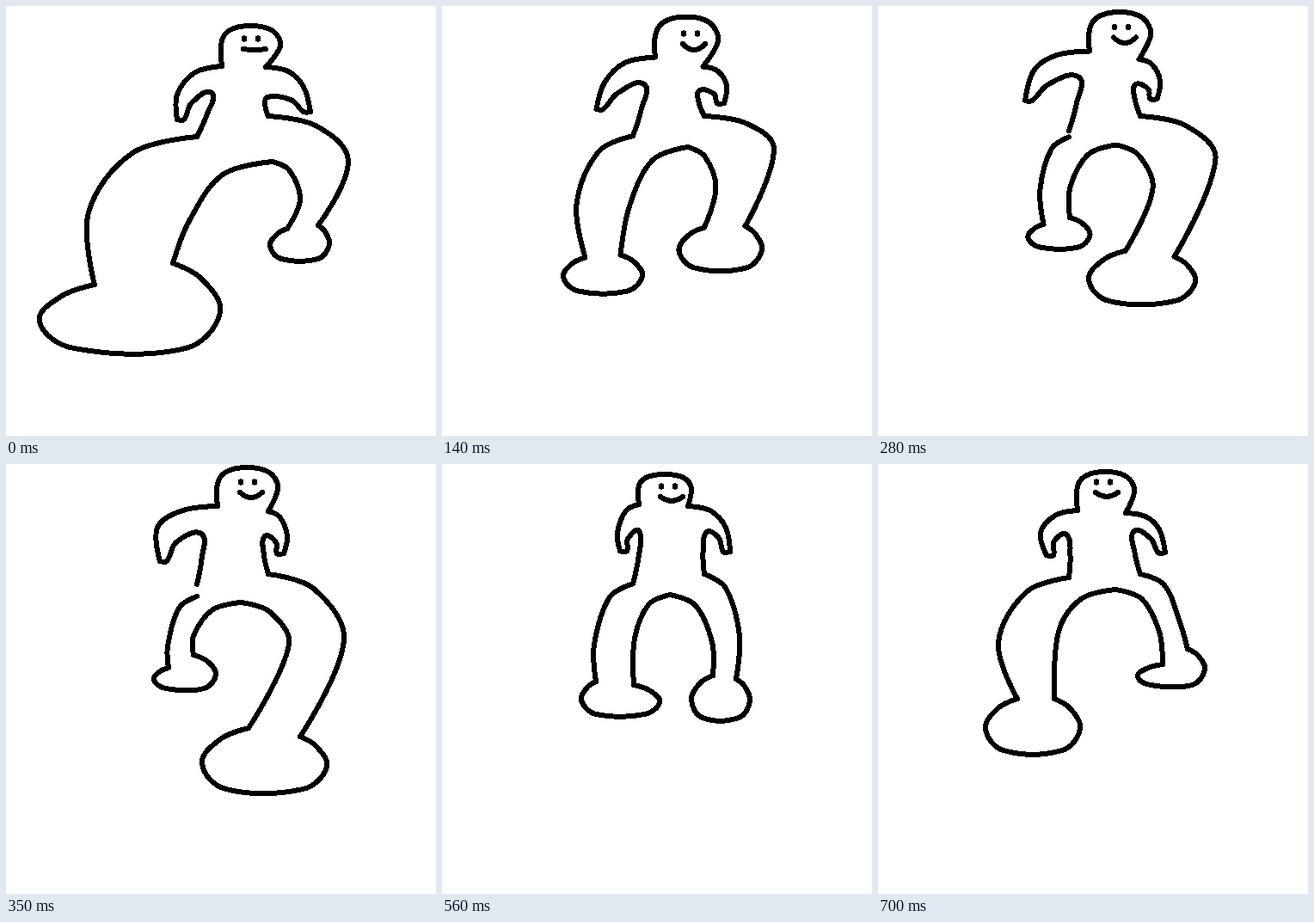
An HTML page that plays this animation: 500 by 500 pixels, repeating every 770 ms.

```html
<!DOCTYPE html>
<html lang="en">
<head>
<meta charset="utf-8">
<title>Stomping walk</title>
<style>
  html, body { margin: 0; width: 100%; height: 100%; overflow: hidden; background: #fff; }
  svg { display: block; width: 100%; height: 100%; }
  path {
    fill: none; stroke: #000; stroke-width: 6; stroke-linecap: round; stroke-linejoin: round;
    shape-rendering: crispEdges;
  }
</style>
</head>
<body>
<svg viewBox="0 0 500 500"><path id="ink"/></svg>
<script>
const STEP = 70, LOOP = 770;

// head: left neck, top, right, right neck    face: eye centre, smile depth
// arm:  elbow, hand, armpit
// leg:  knee, ankle, foot (outer x, inner x, sole y), inner ankle, inner knee
const poses = [
  { at: 0, head: [251, 70, 23, 319, 302, 71], face: [285, 38, 1], crotch: [310, 181], gap: 0,
    armL: [199, 103, 203, 132, 239, 101], armR: [346, 94, 350, 123, 304, 106],
    legL: [96, 240, 103, 324, 39, 249, 398, 194, 299, 213, 250],
    legR: [398, 180, 363, 255, 376, 307, 294, 327, 259, 342, 225] },
  { at: 70, head: [250, 63, 15, 324, 305, 72], face: [293, 36, 6], crotch: [290, 166], gap: 0,
    armL: [191, 103, 200, 133, 230, 98], armR: [333, 94, 326, 114, 301, 98],
    legL: [124, 246, 137, 314, 105, 217, 363, 187, 309, 208, 241],
    legR: [380, 182, 358, 246, 379, 289, 301, 316, 253, 327, 208] },
  { at: 210, head: [246, 56, 10, 318, 302, 69], face: [285, 28, 6], crotch: [281, 162], gap: 0,
    armL: [187, 75, 167, 107, 240, 84], armR: [329, 90, 322, 112, 297, 99],
    legL: [189, 215, 196, 271, 177, 249, 300, 228, 270, 229, 221],
    legR: [392, 150, 347, 266, 365, 262, 308, 294, 262, 310, 215] },
  { at: 350, head: [246, 49, 4, 316, 305, 55], face: [281, 21, 5], crotch: [273, 161], gap: 7,
    armL: [176, 74, 183, 113, 227, 81], armR: [327, 84, 319, 104, 301, 84],
    legL: [188, 212, 189, 237, 172, 244, 261, 218, 222, 218, 200],
    legR: [393, 205, 342, 317, 373, 228, 378, 282, 307, 329, 210] },
  { at: 420, head: [239, 48, 6, 295, 292, 47], face: [264, 20, 3], crotch: [270, 154], gap: 5,
    armL: [190, 80, 198, 107, 224, 82], armR: [333, 68, 331, 110, 308, 71],
    legL: [191, 200, 197, 232, 185, 252, 267, 225, 226, 222, 195],
    legR: [373, 214, 343, 305, 366, 265, 345, 300, 302, 324, 215] },
  { at: 560, head: [229, 47, 12, 290, 286, 49], face: [263, 26, 4], crotch: [265, 152], gap: 0,
    armL: [204, 80, 211, 101, 229, 78], armR: [330, 74, 331, 102, 308, 79],
    legL: [177, 210, 179, 253, 162, 253, 291, 223, 257, 224, 203],
    legR: [346, 200, 342, 250, 358, 290, 295, 315, 246, 314, 207] },
  { at: 700, head: [232, 54, 9, 298, 288, 57], face: [262, 21, 4], crotch: [276, 146], gap: 0,
    armL: [189, 80, 200, 106, 219, 82], armR: [327, 76, 330, 103, 298, 78],
    legL: [140, 208, 162, 273, 125, 235, 333, 205, 273, 210, 195],
    legR: [351, 184, 360, 215, 380, 302, 257, 331, 233, 327, 195] }
];

const mix = (a, b, u) => a + (b - a) * u;
const between = (p, q, u, v = u) => [mix(p[0], q[0], u), mix(p[1], q[1], v)];

// A limb leaves its root sideways, then bends down into the joint.
const bend = (root, joint) => between(root, joint, 0.6, 0.22);

// Smooth line through the points; its ends are corners.
function curve(pts) {
  const last = pts.length - 1;
  const slope = pts.map((_, i) => {
    if (!i || i === last) return [0, 0];
    const x = pts[i + 1][0] - pts[i - 1][0], y = pts[i + 1][1] - pts[i - 1][1];
    const l = Math.hypot(x, y) || 1;
    return [x / l, y / l];
  });
  let d = `M${pts[0]}`;
  for (let i = 1; i <= last; i++) {
    const p = pts[i - 1], q = pts[i], s = slope[i - 1], e = slope[i];
    const k = Math.hypot(q[0] - p[0], q[1] - p[1]) / 3;
    d += `C${p[0] + s[0] * k},${p[1] + s[1] * k} ${q[0] - e[0] * k},${q[1] - e[1] * k} ${q}`;
  }
  return d;
}

function head([lx, ly, top, right, rx, ry]) {
  const left = lx - 1, cx = (left + right) / 2, cy = mix(top, ry, 0.5);
  const pts = [[lx, ly]];
  for (let i = 0; i <= 6; i++) {
    const a = i * Math.PI / 6, c = Math.cos(a);
    pts.push([
      cx - (right - left) / 2 * Math.sign(c) * Math.abs(c) ** 0.85,
      cy - (cy - top) * Math.abs(Math.sin(a)) ** 0.85
    ]);
  }
  return curve([...pts, [rx, ry]]);
}

function face([x, y, smile]) {
  const eye = ex => `M${ex},${y - 0.7}v1.4`;
  return eye(x - 8) + eye(x + 8) + `M${x - 9},${y + 12}q13,${smile * 2.4} 26,0`;
}

function arm(neck, [ex, ey, hx, hy, px, py], hip, side) {
  const elbow = [ex, ey], hand = [hx, hy], pit = [px, py];
  const tip = [hx + 4 * side, hy];
  const inner = between(between(hand, pit, 0.5), elbow, 0.25);
  const waist = between(pit, hip, 0.5);
  waist[0] -= 3 * side;
  return curve([neck, bend(neck, elbow), elbow, tip]) +
    curve([tip, [hx - 4 * side, hy], inner, pit, waist, hip]);
}

function leg(hip, [kx, ky, ax, ay, out, inn, sole, bx, by, ix, iy], crotch) {
  const knee = [kx, ky], ankle = [ax, ay], innerAnkle = [bx, by], innerKnee = [ix, iy];
  const half = (from, x, far) => [
    from,
    between(from, [x, sole], 0.6, 0.18),
    between(from, [x, sole], 1, 0.58),
    [mix(x, far, 0.19), sole]
  ];
  const foot = [...half(ankle, out, inn), ...half(innerAnkle, inn, out).reverse()];
  return curve([hip, bend(hip, knee), knee, ankle]) + curve(foot) +
    curve([innerAnkle, innerKnee, bend(crotch, innerKnee), crotch]);
}

function figure(p, t) {
  const hipY = 152 - 20 * (t / 700) ** 2;
  const hipR = [305, 128], h = p.head;
  return head(h) + face(p.face) +
    arm([h[0], h[1]], p.armL, [222, hipY - p.gap], -1) +
    arm([h[4], h[5]], p.armR, hipR, 1) +
    leg([222, hipY + p.gap], p.legL, p.crotch) +
    leg(hipR, p.legR, p.crotch);
}

function poseAt(t) {
  const i = Math.max(1, poses.findIndex(p => p.at >= t));
  const a = poses[i - 1], b = poses[i], u = (t - a.at) / (b.at - a.at);
  const p = {};
  for (const key in a) {
    p[key] = Array.isArray(a[key]) ? a[key].map((v, n) => mix(v, b[key][n], u)) : mix(a[key], b[key], u);
  }
  return p;
}

const ink = document.getElementById('ink');
const start = performance.now();
let shown = -1;
function tick() {
  const t = Math.floor(((performance.now() - start) % LOOP) / STEP) * STEP;
  if (t !== shown) {
    shown = t;
    ink.setAttribute('d', figure(poseAt(t), t));
  }
  requestAnimationFrame(tick);
}
tick();
</script>
</body>
</html>
```
